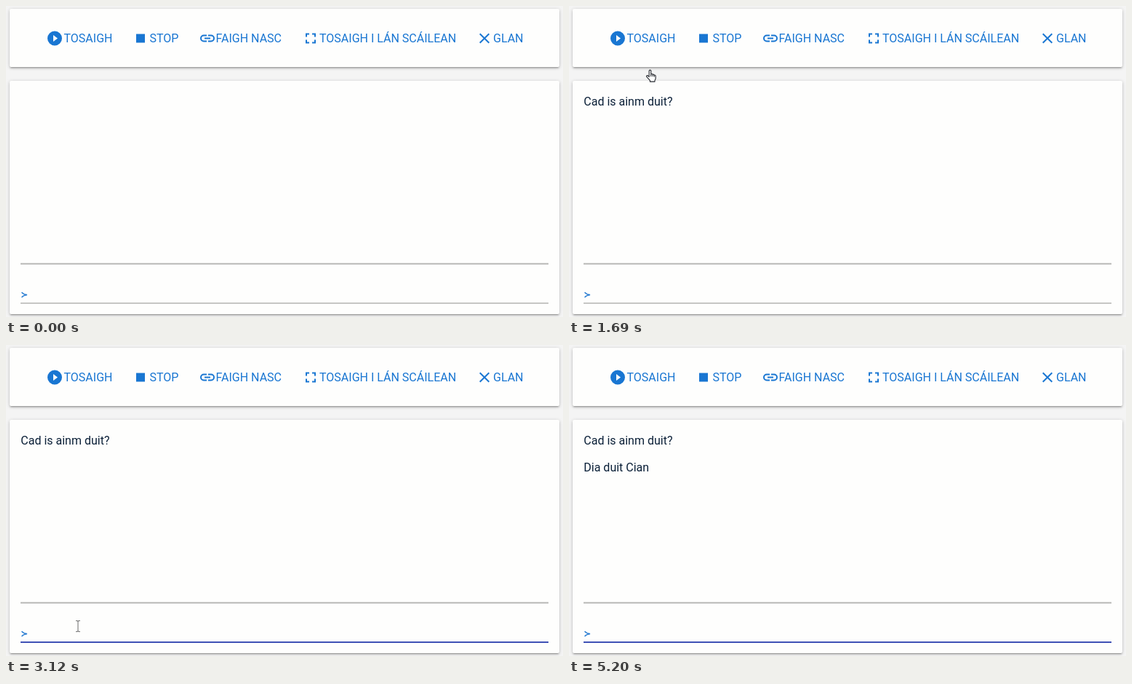
An HTML page that plays this animation: 766x428 px, repeating every 5.85 s.

```html
<!DOCTYPE html>
<html lang="ga">
<head>
<meta charset="utf-8">
<style>
html, body { margin: 0; width: 100%; height: 100%; overflow: hidden; background: #f4f4f4; }
.card {
  position: absolute; left: 5px; width: 756px; border-radius: 2px; background: #fefefd;
  box-shadow: 0 2px 2px rgba(0,0,0,.14), 0 3px 1px -2px rgba(0,0,0,.12), 0 1px 5px rgba(0,0,0,.2);
}
svg { position: absolute; left: 0; top: 0; }
text { font: 16px Roboto, sans-serif; fill: #0b2038; }
.buttons, .buttons text { fill: #1976d2; }
</style>
</head>
<body>
<div class="card" style="top:4px;height:80px"></div>
<div class="card" style="top:103px;height:321px"></div>
<svg width="766" height="428" viewBox="0 0 766 428">
  <rect id="flash" x="46" y="20.5" width="109" height="47" rx="3" fill="#ddecf7"/>
  <g class="buttons">
    <path transform="translate(55 32.5)" d="M12 2a10 10 0 1 0 0 20a10 10 0 1 0 0-20zM10 16.5v-9l6 4.5z" fill-rule="evenodd"/>
    <path transform="translate(173 32.5)" d="M6 6h12v12H6z"/>
    <path transform="translate(265 32.5)" d="M11 8H7a4 4 0 0 0 0 8h4M13 8h4a4 4 0 0 1 0 8h-4M8 12h8" fill="none" stroke="#1976d2" stroke-width="2"/>
    <path transform="translate(407 32.5)" d="M6 10V6h4M14 6h4v4M18 14v4h-4M10 18H6v-4" fill="none" stroke="#1976d2" stroke-width="2"/>
    <path transform="translate(646 32.5)" d="M5.7 5.7l12.6 12.6M18.3 5.7L5.7 18.3" stroke="#1976d2" stroke-width="2"/>
    <text x="79.5" y="50.3">TOSAIGH</text>
    <text x="197.5" y="50.3">STOP</text>
    <text x="288.5" y="50.3">FAIGH NASC</text>
    <text x="431" y="50.3">TOSAIGH I LÁN SCÁILEAN</text>
    <text x="670" y="50.3">GLAN</text>
  </g>
  <text id="question" x="20.3" y="136.5">Cad is ainm duit?</text>
  <text id="reply" x="20.3" y="173.7">Dia duit Cian</text>
  <path d="M20 354.8H746" stroke="#b9b9b7" stroke-width="2"/>
  <path id="underline" d="M20 409H746"/>
  <path d="M21.5 394Q24 397 29 397.5Q24 398 21.5 401" fill="none" stroke="#2f80d3" stroke-width="1.3"/>
  <text id="input" x="38" y="401.5"></text>
  <path id="caret" d="M0 385.5V405.5" stroke="#222" stroke-width="1.2"/>
  <path id="arrow" d="M0 0V15.5L3.7 12.2L6 17.2L8.6 16L6.3 11.2H10.8Z" fill="#080808" stroke="#fff" stroke-width=".8"/>
  <path id="hand" d="M4 1.3Q4 0 5.3 0T6.6 1.3V5.6Q8.6 4.8 9 6.2Q10.7 5.6 11.1 7Q13 6.6 13 8.6V11Q13 13 11.8 14.2V16H5.2V14.2L.8 9.5Q-.1 8.2 1 7.6T4 9.4ZM6.6 6V9M9 6.5V9M11.1 7.2V9.3" fill="#fff" stroke="#25282e" stroke-width="1.1" stroke-linejoin="round"/>
  <path id="beam" d="M-3 -7.5H-1L0 -6.5L1 -7.5H3M0 -6.5V6.5M-3 7.5H-1L0 6.5L1 7.5H3" fill="none" stroke="#777" stroke-width="1.1"/>
</svg>
<script>
const LOOP = 5850, STEP = 130, NAME = 'Cian';
const $ = id => document.getElementById(id);
const clamp = v => Math.max(0, Math.min(1, v));
const progress = (t, a, b) => clamp((t - a) / (b - a));
const mix = (a, b, p) => a + (b - a) * p;
const ease = p => p * p * (3 - 2 * p);
const within = (t, a, b) => t >= a && t < b;
const show = (id, on) => $(id).style.display = on ? '' : 'none';

function place(id, on, x, y) {
  show(id, on);
  $(id).setAttribute('transform', `translate(${x} ${y})`);
}

function drawPointer(t) {
  const enter = ease(progress(t, 260, 650));
  const leave = ease(progress(t, 1560, 2210));
  const x = t < 1560 ? mix(150, 111, enter) : mix(111, 103, leave);
  const y = t < 1560 ? mix(180, 54, enter) : mix(54, 382, leave);
  const overButton = within(t, 650, 1820);
  place('hand', overButton, x - 4, y);
  place('arrow', within(t, 390, 2470) && !overButton, x, y);
  place('beam', within(t, 2470, 5200), 99, 387);
}

function drawInput(t) {
  const focused = t >= 2600;
  $('underline').setAttribute('stroke', focused ? '#3f51b5' : '#90908c');
  $('underline').setAttribute('stroke-width', focused ? 2 : 1.2);
  const typed = t < 4550 ? Math.max(0, Math.floor((t - 3770) / STEP) + 1) : 0;
  $('input').textContent = NAME.slice(0, typed);
  const width = typed ? $('input').getComputedTextLength() : 0;
  place('caret', within(t, 2600, 3120) || within(t, 3510, 5200), 38.7 + width, 0);
}

function draw(now) {
  const t = Math.floor(now % LOOP / STEP) * STEP;
  $('flash').style.opacity = Math.min(progress(t, 910, 1170), 1 - progress(t, 1300, 1560));
  show('question', t >= 1170);
  show('reply', t >= 4550);
  drawPointer(t);
  drawInput(t);
}

const start = performance.now();
function tick() {
  draw(performance.now() - start);
  requestAnimationFrame(tick);
}
tick();
</script>
</body>
</html>
```
